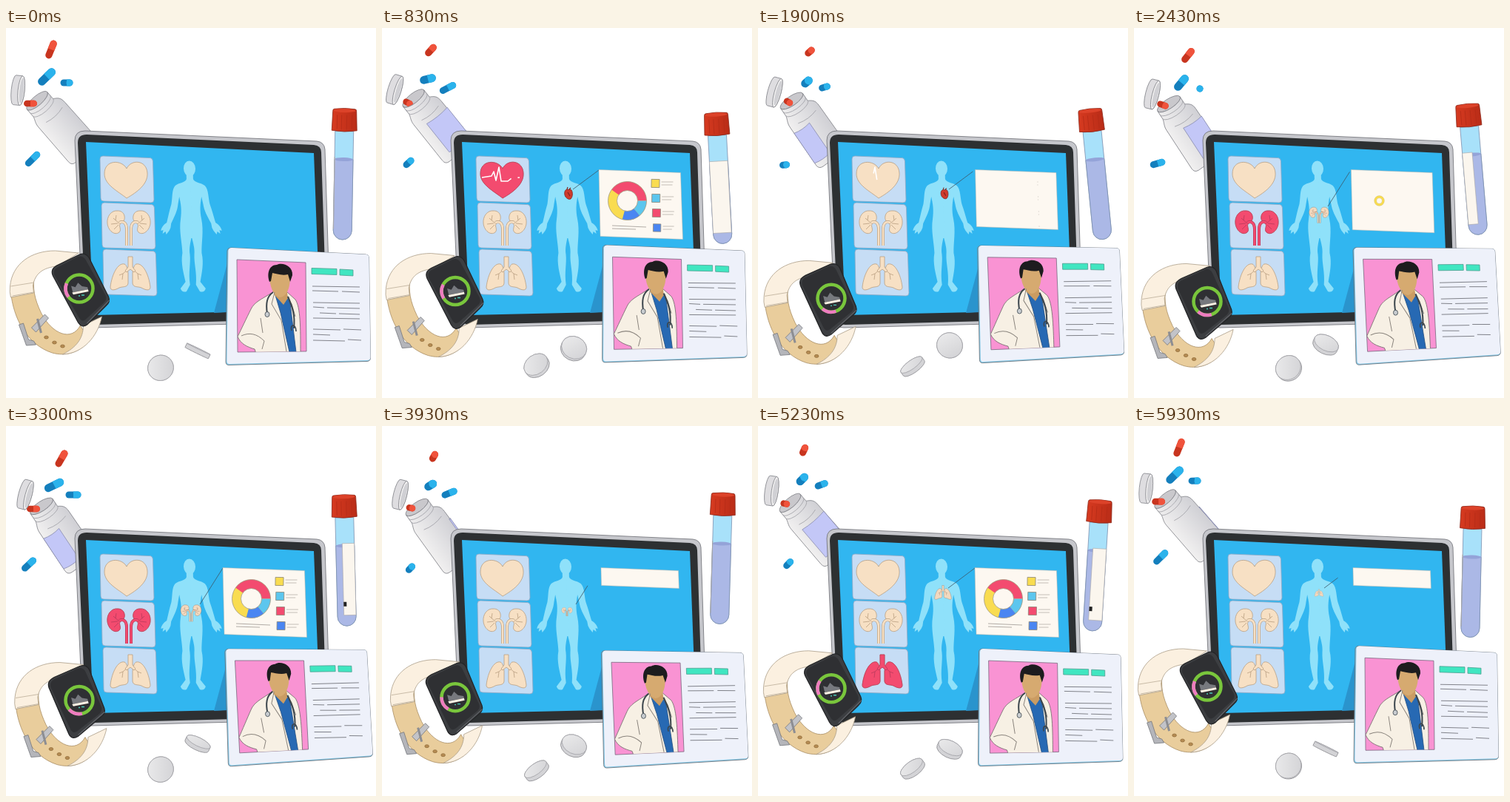
An HTML page with a canvas for the animation above (6010 ms loop, 500 by 500 pixels).

```html
<!DOCTYPE html>
<html lang="en">
<head>
<meta charset="utf-8">
<title>Digital health</title>
<style>
html, body { margin: 0; width: 100%; height: 100%; overflow: hidden; background: #fff; }
canvas { display: block; width: 500px; height: 500px; }
</style>
</head>
<body>
<canvas id="stage" width="500" height="500"></canvas>
<script>
const c = document.getElementById('stage').getContext('2d');
const TAU = Math.PI * 2, RAD = Math.PI / 180, LOOP = 6000;
const KEYS = [0, 850, 1900, 2450, 3300, 4550];
const BEIGE = '#f7e0c4', TAN = '#b99f80', RED = '#f34b6f', WINE = '#b83a5c', INK = '#6b6c73';
const YELLOW = '#f9dc50', SKY = '#5cc6ee', BLUE = '#4a86f2';
let time = 0;

const clamp = (v, a = 0, b = 1) => Math.min(b, Math.max(a, v));
const ramp = (t, from, to) => clamp((t - from) / (to - from));
const easeOut = (u, p = 3) => 1 - (1 - u) ** p;
const wave = (size, deg = 0) => size * Math.sin(time / LOOP * TAU + deg * RAD);
const swing = (size, deg = 0) => wave(size, deg + 90);

// Cyclic smooth curve through one value per key time; turn is the gain per loop.
function curve(values, turn = 0) {
  const key = i => {
    const k = Math.floor(i / 6), j = i - 6 * k;
    return [KEYS[j] + LOOP * k, values[j] + turn * k];
  };
  const slope = i => (key(i + 1)[1] - key(i - 1)[1]) / (key(i + 1)[0] - key(i - 1)[0]);
  let i = 5;
  while (KEYS[i] > time) i--;
  const [ta, a] = key(i), [tb, b] = key(i + 1), d = tb - ta, u = (time - ta) / d;
  return a + (b - a) * u * u * (3 - 2 * u)
    + d * u * (1 - u) * (slope(i) * (1 - u) - slope(i + 1) * u);
}

function paint(path, fill, line, width = 0.8) {
  const p = typeof path === 'string' ? new Path2D(path) : path;
  if (fill) { c.fillStyle = fill; c.fill(p); }
  if (line) { c.strokeStyle = line; c.lineWidth = width; c.stroke(p); }
}

function at(x, y, deg, draw, scale = 1) {
  c.save();
  c.translate(x, y);
  c.rotate(deg * RAD);
  c.scale(scale, scale);
  draw();
  c.restore();
}

function oval(x, y, rx, ry, fill, line) {
  const p = new Path2D();
  p.ellipse(x, y, rx, ry, 0, 0, TAU);
  paint(p, fill, line);
}

function box(x, y, w, h, r, fill, line) {
  const p = new Path2D();
  p.roundRect(x, y, w, h, r);
  paint(p, fill, line);
}

function mirrored(axis, draw) {
  draw();
  c.save();
  c.translate(2 * axis, 0);
  c.scale(-1, 1);
  draw();
  c.restore();
}

function shade(x0, y0, x1, y1, from, to) {
  const g = c.createLinearGradient(x0, y0, x1, y1);
  g.addColorStop(0, from);
  g.addColorStop(1, to);
  return g;
}

// Visible spans of a label wrapped on a cylinder, as left and right in -1..1.
function wrapped(left, width, draw) {
  const start = ((left + 180) % 360 + 360) % 360 - 180;
  for (const a of [start, start - 360]) {
    const l = clamp(a, -90, 90), r = clamp(a + width, -90, 90);
    if (r > l) draw(Math.sin(l * RAD), Math.sin(r * RAD), a > -90 && a < 90);
  }
}

function capsule(x, y, deg, length, r, dark, light) {
  const h = Math.max(0, curve(length) / 2 - r);
  at(curve(x), curve(y), curve(deg), () => {
    box(-h - r, -r, 2 * (h + r), 2 * r, r, dark);
    oval(h, 0, r, r, light);
    c.fillRect(0, -r, h, 2 * r);
  });
}
const redCapsule = (x, y, deg, len, r) => capsule(x, y, deg, len, r, '#c8351f', '#f0533c');
const blueCapsule = (x, y, deg, len, r) => capsule(x, y, deg, len, r, '#147fbd', '#2bb3ec');

function bottle() {
  const x = 45 - swing(3, -15), y = 102.5 - wave(7.5, 34), tilt = -37 - swing(4, 15);
  at(x, y, tilt, () => oval(0, 0, 18, 6.5, '#c9c8cc', '#85868c'));
  redCapsule([33, 35, 41, 39, 37, 40], [102, 101, 100, 104, 112, 108],
    [0, 28, 30, 20, 0, 20], [18, 14, 13, 16, 18, 9], 4.3);
  at(x, y, tilt, () => {
    paint('M-18 0A18 6.5 0 0 0 18 0L18 12C23 15 27 17 27 26L28 88Q28 95 20 96L-15 97Q-22 97 -22 90L-22 28C-22 21 -19 18 -18 13Z',
      shade(-22, 0, 28, 0, '#f1f0f0', '#cfcfd4'), '#85868c');
    paint('M-18 6A18 6.5 0 0 0 18 6M-18 12A18 6.5 0 0 0 18 12M-10 30Q5 34 20 29', null, '#a4a4aa');
    wrapped(curve([90, 335, 610, 710, 970, 1290], 1440), 110, (l, r) => {
      const x0 = 3 + 25 * l, x1 = 3 + 25 * r;
      paint(`M${x0} 38Q${(x0 + x1) / 2} 41 ${x1} 38V87Q${(x0 + x1) / 2} 90 ${x0} 87Z`, '#c3c7f7', '#8f92b4');
    });
  });
}

function lid() {
  at(21 - swing(5, -12), 88 - wave(5, 50), curve([6, 17, 15, 14, 15, 12]), () => {
    const d = 4.5, w = 4.5;
    paint(`M${-d} -20H${d}A${w} 20 0 0 1 ${d} 20H${-d}A${w} 20 0 0 1 ${-d} -20Z`, '#dedde0', '#85868c');
    oval(d, 0, w, 20, '#f3f2f2', '#85868c');
    oval(d + 0.5, 0, w - 1.5, 17, '#d0d0d4');
  });
}

function tablet() {
  paint('M107 139L420 153Q430 154 431 164L438 388Q438 397 428 397L116 405Q105 405 104 395L93 152Q93 139 107 139Z',
    '#c6c7cc', INK);
  paint('M109 144L416 158Q426 159 426 168L433 385Q433 393 425 393L118 401Q109 401 108 392L97 155Q97 144 109 144Z', '#2d3032');
  paint('M108 154L416 169L424 381L118 388Z', '#31b6f0');
}

function organ(kind, fill, line) {
  if (kind === 0) {
    paint('M163 190C157 178 133 177 133 197C133 212 152 221 163 230C177 222 192 211 191 196C190 178 169 177 163 190Z', fill, line);
  } else if (kind === 1) {
    mirrored(166, () => {
      paint('M151 247C142 246 136 255 137 264C138 274 147 281 153 276C157 272 151 267 155 264C159 261 161 259 160 254C159 249 155 247 151 247Z', fill, line);
      const tube = 'M153 263C160 260 163 265 163 272V294';
      paint(tube, null, line, 4);
      paint(tube, null, fill, 2.6);
      paint('M153 264L145 257M151 264L142 265M152 266L146 272M148 260L149 253', null, line);
    });
  } else {
    mirrored(168, () => {
      paint('M160 319C151 317 143 333 141 350C141 356 148 354 153 351C158 349 164 351 165 345L165 331C164 325 163 320 160 319Z', fill, line);
      paint('M166 325L158 332L153 334M158 332L157 340', null, line);
    });
    paint('M165 309H171V323L175 328L173 330L168 326L163 330L161 328L165 323Z', fill, line);
  }
}

function organCard(kind, t) {
  const active = ramp(t, 100, 300) * (1 - ramp(t, 1650, 1890));
  const [x, y] = [[127, 173], [129, 236], [131, 299]][kind];
  paint(`M${x + 4} ${y}L${x + 68} ${y + 2.6}Q${x + 71} ${y + 3} ${x + 71.5} ${y + 7}L${x + 73} ${y + 59}Q${x + 73} ${y + 63} ${x + 69} ${y + 63}L${x + 5} ${y + 61}Q${x + 1} ${y + 61} ${x + 1} ${y + 57}L${x} ${y + 4}Q${x} ${y} ${x + 4} ${y}Z`,
    '#c6ddf5', '#8ea9c4');
  organ(kind, BEIGE, TAN);
  c.globalAlpha = active;
  if (active) organ(kind, RED, WINE);
  c.globalAlpha = 1;
  if (kind === 0 && t > 200 && t < 1950) {
    const gap = ((t * 0.115 - 13) % 115 + 115) % 115;
    c.setLineDash(t < 1750 ? [gap, 9, 200] : [0, 42, 26, 200]);
    paint('M135 202L148 200L151 194L154 206L158 188L161 207L170 207L175 203L186 202', null, '#fff', 1.6);
    c.setLineDash([]);
  }
}

// The figure leans slightly to the right towards the feet.
function person() {
  c.save();
  c.transform(1, 0, 0.03, 1, -5.7, 0);
  oval(248, 190, 8, 10.5, '#8fe1fa');
  mirrored(248, () => paint('M247 194H252.5V204C254 209 263 209 268 213C273 218 272 229 274 238C277 247 279 256 281 263C286 266 289 271 289 274L286 273L287 278L283 275L282 279L278 274L276 270L275 264C270 254 266 247 265 238L263 228C261 238 260 246 262 258C265 274 261 290 261 304C264 318 260 332 258 343L265 352Q263 358 257 356L252 347C254 330 250 318 251 306C252 298 250 291 248.5 284H247Z', '#8fe1fa'));
  c.restore();
}

function chart(size, sweep) {
  at(331.5, 233.5, 0, () => {
    const arc = (from, to, color) => {
      const p = new Path2D();
      p.arc(0, 0, 20, from * RAD, to * RAD);
      paint(p, null, color, 12);
    };
    arc(0, 360, YELLOW);
    [[-145, 0, RED], [0, 50, SKY], [50, 105, BLUE]].forEach(([a, b, color]) => {
      const end = Math.min(b, -145 + 250 * sweep);
      if (end > a) arc(a, end, color);
    });
    oval(0, 0, 26, 26, null, '#a09a8a');
    oval(0, 0, 14, 14, null, '#a09a8a');
  }, size);
}

function popup(kind, t) {
  const open = easeOut(ramp(t, 100, 750)) * (1 - ramp(t, 1860, 1965) ** 2);
  if (open <= 0) return;
  const grow = Math.sqrt(open), x = [258, 262, 257][kind], y = [218, 241, 219][kind];
  if (kind === 0) at(252, 224, 0, () => {
    paint('M-2 -6C-6 -5 -6 1 -4 4C-2 7 1 8 3 7C6 4 6 -2 4 -5C2 -7 0 -5 -2 -6Z', '#cf3b2c', '#7d2520');
    paint('M-2 -6L-1 -9M1 -6L3 -8M-1 -2L2 3', null, '#7d2520', 1.2);
  }, grow);
  else at(250, kind === 1 ? 249 : 226, 0, () => {
    c.translate(kind === 1 ? -166 : -168, kind === 1 ? -262 : -334);
    organ(kind, '#f2d9bf', '#9a7058');
  }, (kind === 1 ? 0.48 : 0.42) * grow);
  paint(`M${x} ${y}L${x + (293 - x) * grow} ${y + (192 - y) * grow}`, null, '#3d5666');

  const inset = 4 * (1 - open), h = 90 * open;
  paint(`M${293 + inset} 191.5L${403.5 - inset} 195.5L${403.5 - inset + 3 * open} ${195.5 + h}L${293 + inset + 2 * open} ${191.5 + h}Z`,
    '#fdf8f1', '#b9b4ac', 0.5);

  const out = 1 - ramp(t, 1600, 1830);
  const size = easeOut(ramp(t, 390, 810), 2) * out;
  if (size > 0) chart(size, easeOut(ramp(t, 580, 840), 2));

  [YELLOW, SKY, RED, BLUE].forEach((color, i) => {
    const start = 520 + 45 * i;
    const u = easeOut(ramp(t, start, start + 260), 2);
    const square = u * out, line = u * (1 - ramp(t, 1640, 1915));
    const x = 369.5 + i * 0.7, y = 210 + 20 * i;
    if (square > 0) at(x, y, 1, () => box(-5.5, -5.5, 11, 11, 0, color, '#8b8577'), square);
    if (line > 0) paint(`M${x + 8} ${y - 2}h${16 * line}M${x + 8} ${y + 2}h${(i % 2 ? 13 : 15) * line}`, null, '#b5afa7');
  });
  const text = easeOut(ramp(t, 560, 820), 2) * out;
  if (text > 0) paint(`M311 267l${46 * text} ${2 * text}M311 271l${32 * text} ${text}`, null, '#9d9993');
}

function tube() {
  at(457.5 - swing(1.5), 199 + wave(12, 33), -0.9 - wave(4.8, -24), () => {
    paint('M-12.5 -66H12.5V68A12.5 12.5 0 0 1 -12.5 68Z', '#a8e1fa', '#7f92b0');
    paint('M-12.5 -28H12.5V68A12.5 12.5 0 0 1 -12.5 68Z', '#abb8e6', '#7f92b0');
    oval(0, -28, 12.5, 2.5, '#94a3d8');
    wrapped(-252 + time * 0.18, 175, (l, r, edge) => {
      const x0 = 12.5 * l, x1 = 12.5 * r;
      paint(`M${x0} -31H${x1}V66H${x0}Z`, '#fbf6ee', '#a9a6a6', 0.6);
      if (edge) {
        c.fillStyle = '#222';
        c.fillRect(x0, 48, Math.min(4, x1 - x0), 6);
      }
    });
    paint('M-14 -96Q0 -98 14 -96Q16 -96 16 -93L17 -67Q0 -64 -17 -67L-16 -93Q-16 -96 -14 -96Z',
      shade(-17, 0, 17, 0, '#d63a20', '#b92c17'), '#8c2a1c');
    oval(0, -94, 15, 2.6, '#dc4229');
    paint('M-10 -88V-69M-4 -88V-68M3 -88V-68M10 -88V-69', null, '#b52c18');
  });
}

function pill(x, y, deg, squash) {
  const q = clamp(curve(squash), 0.03), d = 3 * Math.sqrt(1 - q * q), ry = 17 * q;
  at(x, y, deg, () => {
    paint(`M-17.5 ${-d}A17.5 ${ry} 0 0 1 17.5 ${-d}V${d}A17.5 ${ry} 0 0 1 -17.5 ${d}Z`, '#d3d3d6', '#919196');
    oval(0, -d, 17.5, ry, shade(-15, -10, 15, 12, '#e9e9ea', '#d3d3d6'), '#a5a5aa');
  });
}

function watch() {
  const dy = 9.5 - swing(9.5), dx = 3.5 - swing(3.5, -30), turn = 0.5 - swing(0.5);
  at(dx, dy, 0, () => {
    paint('M6 356C9 392 28 428 62 439C80 444 99 439 112 422L100 402C88 424 62 414 47 385C38 366 35 352 38 332Z', '#e9cd9c', '#a98e66');
    paint('M5 349C8 318 34 301 66 301L98 304L68 322C50 324 39 331 36 348L37 358L6 364Q4 357 5 349Z', '#fbf0e0', '#ab9d88');
    paint('M76 441C104 440 124 416 129 390L104 402C104 420 94 432 76 441Z', '#fbf0e0', '#ab9d88');
    paint('M6 349L37 344M8 362L37 357', null, '#bcae98');
    paint('M17 401L23 399L30 421L37 423L40 428L27 429Z', '#b4b5ba', '#74767c');
    paint('M34 405L52 387L57 392L40 411Z', '#c2c3c8', '#74767c');
    paint('M42 393L47 412', null, '#8c8d92', 3);
    [[54, 418], [65, 425], [76, 430]].forEach(([x, y]) => oval(x, y, 2.8, 2, '#b58b52', '#94703f'));
  });
  at(101 + dx - 13 * turn, 354 + dy, 0, () => {
    c.transform(1 + 0.05 * turn, 0, -0.14 * turn, 1, 0, 0);
    paint('M-33 -33L-2 -48Q6 -51 11 -43L37 9Q40 16 34 21L8 47Q1 52 -4 44L-38 -19Q-42 -28 -33 -33Z', '#3c3e41', '#232426', 1.2);
    paint('M-33 -30L-4 -45Q2 -47 6 -41L33 7Q36 13 30 18L6 40Q1 44 -3 37L-36 -20Q-38 -27 -33 -30Z', '#2f3033');
    paint('M38 14L8 45', null, '#606267', 1.2);
  });
  at(99, 352 + dy, 0, () => {
    const ring = new Path2D(), pink = new Path2D(), a = curve([172, 178, 100, 102, 108, 185]);
    ring.arc(0, 0, 18.5, 0, TAU);
    pink.arc(0, 0, 18.5, (a - 30) * RAD, (a + 30) * RAD);
    paint(ring, null, '#79c63c', 4.5);
    paint(pink, null, '#ee7cc0', 4.5);
    at(0, -1, -14, () => {
      paint('M-10 -5L-5 -2L0 -7L4 -1L11 2V5L-10 4Z', '#77797e');
      paint('M-11 4L11 5V8L-10 7Z', '#fff4e6');
    });
    paint('M-1 10h2M3 9h4', null, '#49c7b5', 1.4);
  });
}

function doctor() {
  const photo = 'M312 313L405 317L406 437L313 438Z';
  paint(photo, '#f993d3', '#7a6a80');
  c.save();
  c.clip(new Path2D(photo));
  paint('M354 361L364 355L380 357L391 367C398 377 398 405 398 440H338L336 434C326 431 317 427 313 417C318 407 325 392 331 380C335 371 346 366 354 361Z', '#f7f0e4', '#6d6a68');
  paint('M363 358L380 362L384 372L392 438H383L371 385Z', '#2769b3', '#254f80');
  paint('M363 346L379 350L381 365L375 374L362 360Z', '#cb9c62');
  paint('M356 333C356 350 361 361 370 364C379 363 384 352 384 336L380 328L361 327Z', '#d6aa70');
  paint('M356 343C352 331 356 320 366 320C373 316 388 321 387 334L384 343L381 333C373 335 365 332 360 331L358 342Z', '#1d1c1e');
  paint('M363 357L359 373L372 395L379 437M380 363L386 373L391 390', null, '#8b857e', 1);
  paint('M318 416C329 411 339 413 349 423L346 434M344 392L347 412', null, '#8b857e', 1);
  paint('M361 357C352 363 351 373 353 386M381 363C387 377 391 388 389 406', null, '#3b454c', 2);
  oval(353, 387, 3, 3.5, '#c8ccd0', '#3b454c');
  paint('M386 409C383 400 392 399 392 410', null, '#3b454c', 1.6);
  c.restore();
}

function idCard() {
  at(297, 375 - wave(5.5, 16), -1.25 + swing(1.25), () => {
    c.translate(-297, -373.5);
    paint('M304 297L486 306Q490 306 490.5 310L492.5 446Q492.5 450 488 450.5L301 455.5Q297 455.5 297 451L299 301Q299.5 297 304 297Z', '#86cbe9', INK);
    paint('M305 297L486 306Q490 306 490.5 310L492.5 445Q492.5 449 488 449L302 454Q298.5 454 298.5 450L300.5 301Q301 297 305 297Z', '#eef1fa');
    doctor();
    paint('M413 324.5L447 325.5V333.5L413 332.5Z', '#40e6c1', '#4f9e90');
    paint('M451 326L469 327V335L451 334Z', '#40e6c1', '#4f9e90');
    [[414, 349, 478], [414, 355, 449], [454, 356, 478], [415, 371, 478], [415, 377, 430], [434, 378, 478],
      [424, 385, 446], [450, 386, 478], [415, 392, 478], [415, 407, 452], [456, 407, 480], [415, 414, 438],
      [415, 422, 458], [462, 421, 480]]
      .forEach(([x, y, end]) => paint(`M${x} ${y}L${end} ${y + 1}`, null, '#75777e', 0.9));
  });
}

function draw() {
  c.clearRect(0, 0, 500, 500);
  c.lineJoin = 'round';
  const t = time % 2000, kind = Math.floor(time / 2000);
  bottle();
  lid();
  redCapsule([61, 66, 70, 73, 75, 65], [29, 30, 32, 37, 44, 37],
    [-68, -48, -42, -52, -60, -60], [26, 19, 15, 23, 25, 9], 4.6);
  blueCapsule([55, 62, 66, 64, 65, 65], [66, 69, 73, 74, 80, 78],
    [-44, -14, -40, -50, -26, -40], [29, 22, 17, 25, 28, 11], 5.4);
  blueCapsule([82, 89, 90, 89, 91, 90], [74, 81, 80, 82, 93, 86],
    [0, -27, -16, -8, 0, -38], [17, 24, 16, 9, 21, 21], 4.5);
  blueCapsule([36, 36, 36, 32, 31, 44], [177, 182, 185, 183, 187, 194],
    [-45, -42, -6, -16, -43, -45], [25, 17, 14, 21, 24, 9], 4.5);
  tablet();
  for (let i = 0; i < 3; i++) organCard(i, i === kind ? t : 0);
  person();
  popup(kind, t);
  paint('M299 318L281 385L300 384Z', '#2a94cd');
  tube();
  pill(209, 461 - wave(5, 20), -36, [1, 0.76, 0.34, 0.93, 1, 0.03]);
  pill(259, 432.5 + swing(4.5, 30), 26, [0.03, 0.88, 1, 0.6, 0.34, 1]);
  watch();
  idCard();
}

// The picture advances in twenty poses per second.
function tick() {
  const now = performance.now() % 6010;
  const pose = Math.min(119, 2 * Math.floor(now / 100) + (now % 100 >= 30 ? 1 : 0));
  time = pose * 50;
  draw();
  requestAnimationFrame(tick);
}
tick();
</script>
</body>
</html>
```
